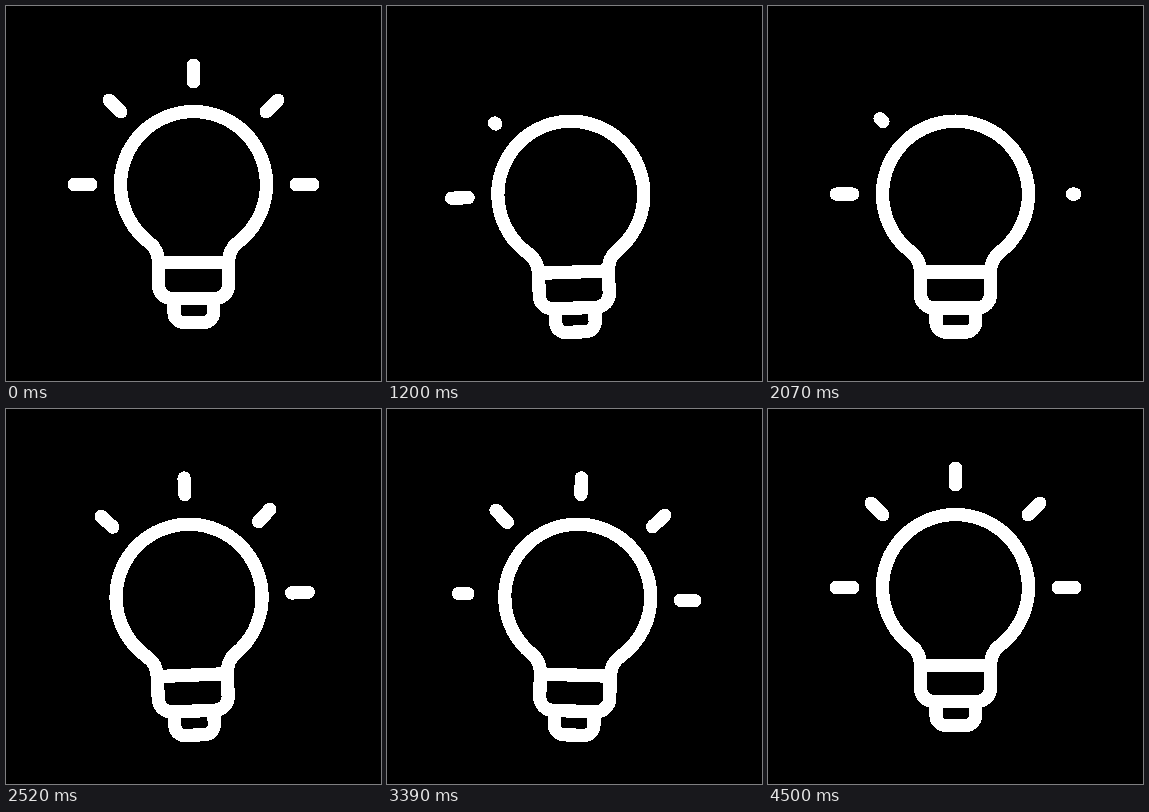
Recreate the animation shown at these times as an HTML page. Size 375 px wide and 375 px high, loop 5.4 s.

```html
<!DOCTYPE html>
<html lang="en">
<head>
<meta charset="utf-8">
<title>Light bulb</title>
<style>
  html, body { margin: 0; width: 100%; height: 100%; overflow: hidden; background: #000; }
  svg { display: block; width: 100%; height: 100%; }
  g { fill: none; stroke: #fff; stroke-width: 13.3; stroke-linecap: round; stroke-linejoin: round; shape-rendering: crispEdges; }
</style>
</head>
<body>
<svg viewBox="0 0 375 375">
  <g id="lamp">
    <path d="M152.5 256.5C152.5 248 149 241 143 236.4A73 73 0 1 1 232 236.4C226 241 222.5 248 222.5 256.5
             V279A13.5 13.5 0 0 1 209 292.5H166A13.5 13.5 0 0 1 152.5 279ZH222.5"/>
    <path d="M168 292.5V306.5A10 10 0 0 0 178 316.5H197.5A10 10 0 0 0 207.5 306.5V292.5"/>
  </g>
</svg>
<script>
const LOOP = 5400, STEP = 30;
const CX = 187.5, CY = 178.5, PIVOT_Y = 286;
const RAYS = 5, INNER = 102.7, OUTER = 119.3;
const TURN = 106, CLEAR = 470, LAST_WAVE = 3, LAST_TURN = 120;
const SWING = 2.4, PERIOD = 620, SWING_START = 1295, SWING_END = SWING_START + 3.5 * PERIOD;

const lamp = document.getElementById("lamp");
const rays = Array.from({ length: RAYS }, () =>
  lamp.appendChild(document.createElementNS("http://www.w3.org/2000/svg", "line")));

const clamp = (x, low, high) => Math.min(high, Math.max(low, x));
const ramp = (t, from, to) => clamp((t - from) / (to - from), 0, 1);
const sine = p => (1 - Math.cos(Math.PI * p)) / 2;
const cubic = p => p < .5 ? 4 * p ** 3 : 1 - 4 * (1 - p) ** 3;

// Hop up, drop below the resting place, then settle back.
const lift = t => -24 * cubic(ramp(t, 165, 570))
  + 33.6 * cubic(ramp(t, 660, 960))
  - 9.6 * cubic(ramp(t, 3690, 4020));

// A steady wobble, eased in and out.
function tilt(t) {
  const phase = (clamp(t, SWING_START, SWING_END) - SWING_START) / PERIOD;
  return -SWING * Math.cos(2 * Math.PI * phase)
    * sine(ramp(t, 960, SWING_START)) * (1 - sine(ramp(t, SWING_END, 3700)));
}

// Successive waves begin a little further apart.
const waveStart = n => 1084 + 815 * n + 40 * n * n;

// Visible part of a ray: it grows from the inside and clears outwards.
function span(i, t) {
  if (t < 600) return [ramp(t, 170, 545), 1];
  for (let n = 0; n <= LAST_WAVE; n++) {
    const last = n === LAST_WAVE, turn = last ? LAST_TURN : TURN;
    const grow = waveStart(n) + i * turn;
    const clear = last ? LOOP : grow + CLEAR;
    if (t > grow && t < clear + turn)
      return [ramp(t, clear, clear + turn), ramp(t, grow, grow + turn)];
  }
  return [1, 1];
}

function drawRay(node, i, t) {
  const [from, to] = span(i, t);
  const angle = Math.PI * (1 + i / (RAYS - 1));
  [from, to].forEach((part, k) => {
    const radius = INNER + (OUTER - INNER) * part;
    node.setAttribute(`x${k + 1}`, CX + radius * Math.cos(angle));
    node.setAttribute(`y${k + 1}`, CY + radius * Math.sin(angle));
  });
  node.setAttribute("visibility", to > from ? "visible" : "hidden");
}

function draw(time) {
  const t = Math.floor((time % LOOP) / STEP) * STEP;
  lamp.setAttribute("transform", `translate(0 ${lift(t)}) rotate(${tilt(t)} ${CX} ${PIVOT_Y})`);
  rays.forEach((node, i) => drawRay(node, i, t));
}

const begin = performance.now();
function tick() {
  draw(performance.now() - begin);
  requestAnimationFrame(tick);
}
tick();
</script>
</body>
</html>
```
